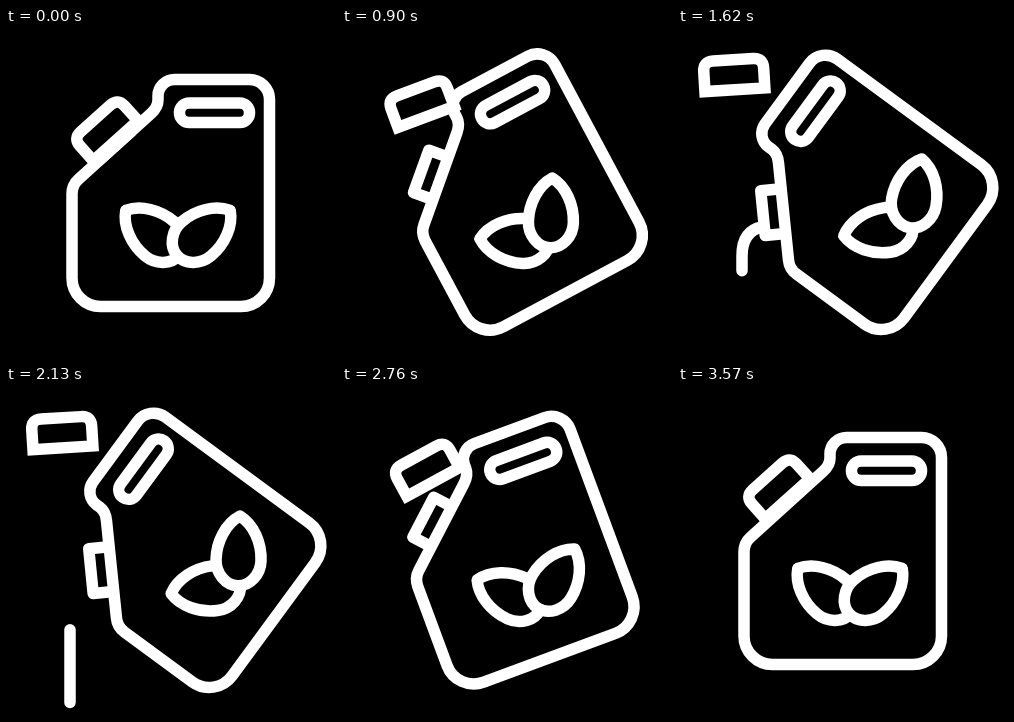
These frames come from a looping animation (330x330 px, 3600 ms). An HTML page with a canvas:

```html
<!DOCTYPE html>
<html lang="en">
<head>
<meta charset="utf-8">
<title>Pouring canister</title>
<style>
  html, body { margin: 0; width: 100%; height: 100%; overflow: hidden; background: #000; }
  canvas { display: block; width: 330px; height: 330px; }
</style>
</head>
<body>
<canvas id="stage" width="330" height="330"></canvas>
<script>
const ctx = document.getElementById('stage').getContext('2d');
const LOOP = 3600;
const ACTIVE = 3570;
const MAX_TILT = 53.7;
const CENTER = { x: 164.75, y: 165 };
const rad = deg => deg * Math.PI / 180;
const clamp = v => Math.max(0, Math.min(1, v));
const smooth = v => v * v * (3 - 2 * v);

const bodyPath = new Path2D(
  'M243.5 51.5A20 20 0 0 1 263.5 71.5V250A28.5 28.5 0 0 1 235 278.5H94.5' +
  'A28.5 28.5 0 0 1 66 250V166Q66 157 72.5 151.2L145 85.5Q152 79.2 152 72V68' +
  'A16.5 16.5 0 0 1 168.5 51.5Z');
const handlePath = new Path2D(
  'M183.2 75H233.8A9.75 9.75 0 0 1 233.8 94.5H183.2A9.75 9.75 0 0 1 183.2 75Z');
const capPath = new Path2D('M-30 15V-5Q-30 -15 -20 -15H20Q30 -15 30 -5V15Z');
const leafPath = new Path2D(
  'M0 -46C14 -38 22.5 -20 22.5 -2C22.5 12 12 23.7 0 23.7C-12 23.7 -22.5 12 -22.5 -2C-22.5 -20 -14 -38 0 -46Z');
const streamPath = new Path2D('M84 199Q64 203 64 228V318');
const STREAM_LENGTH = 127;

// Keys start with tilt in degrees: center x, center y, angle
const capKeys = [
  [0, 99.6, 101.6, -42],
  [4.2, 94.5, 99, -45.5],
  [28, 79, 75, -20.5],
  [42.5, 66, 60.5, -11],
  [MAX_TILT, 56, 46.8, -3.5]
];
// Keys start with time: swing, shift x, shift y
const rightLeafKeys = [
  [0, 0, 0, 0],
  [480, -19, -1, 0],
  [900, -20, -4, 1],
  [1620, 14, 8, 3],
  [2520, 0, 3, 2.5],
  [3090, 5, 0, 0],
  [3570, 0, 0, 0]
];
const leftLeafKeys = [
  [0, 0, 0, 0],
  [480, -15, 0, 0],
  [900, -9, 1, 2],
  [1620, 6, 4, 1],
  [2520, 7, 3, 1.5],
  [3090, 3, 0, 0],
  [3570, 0, 0, 0]
];

function sample(keys, at, ease = v => v) {
  let i = 0;
  while (i < keys.length - 2 && at > keys[i + 1][0]) i++;
  const a = keys[i], b = keys[i + 1];
  const k = ease(clamp((at - a[0]) / (b[0] - a[0])));
  return a.slice(1).map((v, j) => v + (b[j + 1] - v) * k);
}

// Slow start, fast middle, soft stop; mirrored for the way back
function tiltAt(time) {
  const t = Math.max(0, Math.min(time, ACTIVE - time));
  return t < 900
    ? 28 * (t / 900) ** 3
    : 28 + (MAX_TILT - 28) * (1 - (1 - clamp((t - 900) / 600)) ** 3);
}

function placed(x, y, deg, draw) {
  ctx.save();
  ctx.translate(x, y);
  ctx.rotate(rad(deg));
  draw();
  ctx.restore();
}

function drawNeck(depth) {
  if (depth <= 0) return;
  placed(109, 118, -42, () => {
    ctx.lineJoin = 'round';
    ctx.beginPath();
    ctx.moveTo(-22.5, 0);
    ctx.lineTo(-22.5, -depth);
    ctx.lineTo(22.5, -depth);
    ctx.lineTo(22.5, 0);
    ctx.stroke();
  });
}

function drawStream(time) {
  const head = STREAM_LENGTH * clamp((time - 1390) / 550);
  const tail = STREAM_LENGTH * clamp((time - 1930) / 470);
  if (head - tail < 0.5) return;
  ctx.save();
  ctx.lineCap = 'round';
  ctx.setLineDash([head - tail, 400]);
  ctx.lineDashOffset = -tail;
  ctx.stroke(streamPath);
  ctx.restore();
}

// Leaves ride on the tilting body and swing a little around their own centers
function drawLeaf(keys, time, tilt, slide, offset, restAngle) {
  const [swing, shiftX, shiftY] = sample(keys, time, smooth);
  const c = Math.cos(rad(tilt)), s = Math.sin(rad(tilt));
  const x = CENTER.x + slide + shiftX + offset * c + 47 * s;
  const y = CENTER.y + shiftY - offset * s + 47 * c;
  placed(x, y, restAngle + swing - tilt, () => {
    ctx.lineJoin = 'round';
    ctx.fill(leafPath);
    ctx.stroke(leafPath);
  });
}

function render(time) {
  const tilt = tiltAt(time);
  const lean = tilt / MAX_TILT;
  const slide = 10.5 * lean ** 1.3;
  const [capX, capY, capAngle] = sample(capKeys, tilt);

  ctx.fillStyle = '#000';
  ctx.fillRect(0, 0, 330, 330);
  ctx.strokeStyle = '#fff';
  ctx.lineWidth = 11.5;
  ctx.lineJoin = 'miter';

  drawStream(time);
  placed(CENTER.x + slide + lean, CENTER.y + lean, -tilt, () => {
    ctx.translate(-CENTER.x, -CENTER.y);
    drawNeck(20.5 * clamp(tilt / 16));
    ctx.stroke(bodyPath);
    ctx.stroke(handlePath);
  });
  drawLeaf(leftLeafKeys, time, tilt, slide, -9.75, -50);
  drawLeaf(rightLeafKeys, time, tilt, slide, 24.25, 50);
  placed(capX, capY, capAngle, () => ctx.stroke(capPath));
}

const start = performance.now();
function tick() {
  render((performance.now() - start) % LOOP);
  requestAnimationFrame(tick);
}
tick();
</script>
</body>
</html>
```
